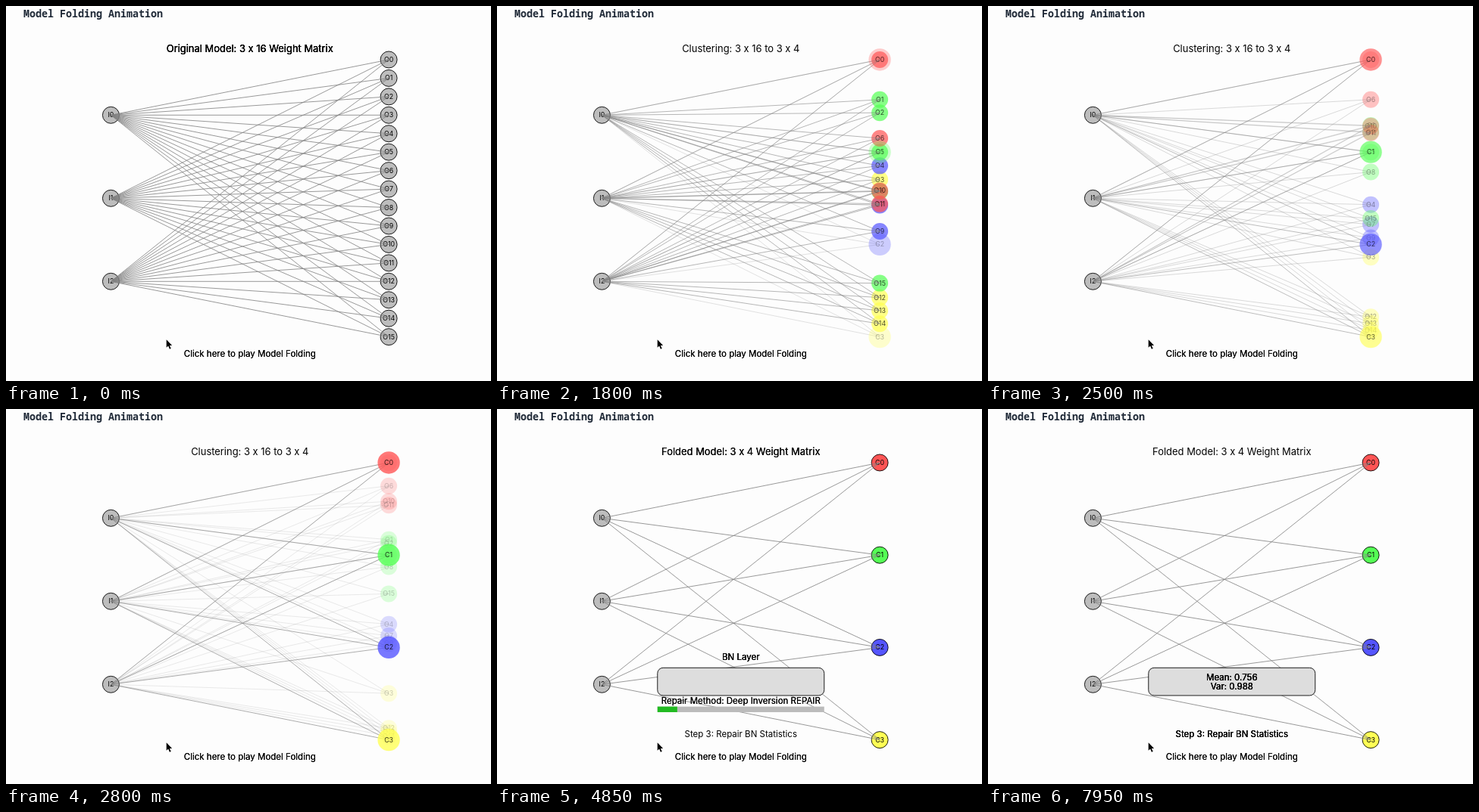
An HTML page with a canvas for the animation above (8.05 s loop, 640 px wide and 496 px high).

```html
<!DOCTYPE html>
<html lang="en">
<head>
<meta charset="utf-8">
<title>Model Folding Animation</title>
<style>
  html, body { margin: 0; width: 100%; height: 100%; overflow: hidden; background: #fdfdfd; }
  canvas { position: absolute; left: 0; top: 0; width: 640px; height: 496px; }
  h1 {
    position: absolute; left: 23px; top: 0; margin: 0; color: #1f2937; white-space: nowrap;
    font: bold 13.33px/20px "Noto Sans Mono", "DejaVu Sans Mono", monospace;
  }
</style>
</head>
<body>
<canvas id="stage"></canvas>
<h1>Model Folding Animation</h1>
<script>
const LOOP = 8050;
const FOLD_START = 1220, FOLD_TIME = 2000;
const REPAIR_START = 4614, REPAIR_TIME = 2000;
const SCALE = 11 / 15, LEFT = 65.1, TOP = 34.3;
const MID = 350, IN_X = 100, OUT_X = 600;
const TITLE = 17.65, BODY = 15.7, LABEL = 12;

const GRAY = '#bdbdbd';
const COLORS = ['#ff5555', '#55ff55', '#5555ff', '#ffff55'];
const CLUSTER_OF = [0, 1, 1, 3, 2, 1, 0, 2, 1, 2, 0, 0, 3, 3, 3, 1];

const column = (count, x, top, gap, name) =>
  Array.from({ length: count }, (_, i) => ({ x, y: top + gap * i, name: name + i }));

const inputs = column(3, IN_X, 150, 150, 'I');
const outputs = column(16, OUT_X, 50, 500 / 15, 'O');
const clusters = column(4, OUT_X, 50, 500 / 3, 'C');

const canvas = document.getElementById('stage');
const ctx = canvas.getContext('2d');
const ratio = window.devicePixelRatio || 1;
canvas.width = 640 * ratio;
canvas.height = 496 * ratio;

// Repeated passes thicken the antialiased glyph edges.
function text(str, x, y, size, passes = 1) {
  ctx.font = `${size}px Inter, "Noto Sans", sans-serif`;
  ctx.fillStyle = '#000';
  for (let i = 0; i < passes; i++) ctx.fillText(str, x, y + 0.6);
}

function node(n, color, radius, outlined) {
  ctx.beginPath();
  ctx.arc(n.x, n.y, radius, 0, Math.PI * 2);
  ctx.fillStyle = color;
  ctx.fill();
  if (outlined) {
    ctx.strokeStyle = '#000';
    ctx.lineWidth = 1.2;
    ctx.stroke();
  }
  text(n.name, n.x, n.y, LABEL);
}

function edges(targets) {
  ctx.strokeStyle = '#808080';
  ctx.lineWidth = 1.1;
  for (const a of inputs) {
    for (const b of targets) {
      ctx.beginPath();
      ctx.moveTo(a.x, a.y);
      ctx.lineTo(b.x, b.y);
      ctx.stroke();
    }
  }
}

const drawInputs = () => inputs.forEach(n => node(n, GRAY, 15, true));
const drawClusters = (radius, outlined) =>
  clusters.forEach((n, i) => node(n, COLORS[i], radius, outlined));

function drawOriginal() {
  text('Original Model: 3 x 16 Weight Matrix', MID, 30, TITLE, 3);
  drawInputs();
  outputs.forEach(n => node(n, GRAY, 15, true));
  edges(outputs);
}

function drawFolding(p) {
  text('Clustering: 3 x 16 to 3 x 4', MID, 30, TITLE);
  drawInputs();
  const moving = outputs.map((n, i) => ({
    ...n, y: n.y + (clusters[CLUSTER_OF[i]].y - n.y) * p
  }));
  ctx.globalAlpha = 1 - p;
  moving.forEach((n, i) => node(n, COLORS[CLUSTER_OF[i]], 15, false));
  edges(moving);
  ctx.globalAlpha = p;
  edges(clusters);
  drawClusters(20, false);
  ctx.globalAlpha = 1;
}

function drawFolded() {
  text('Folded model: 3 x 4 Weight Matrix', MID, 30, TITLE, 2);
  drawInputs();
  drawClusters(20, false);
  edges(clusters);
}

function drawRepair(p) {
  const done = p >= 1;
  text('Folded Model: 3 x 4 Weight Matrix', MID, 30, TITLE, done ? 1 : 2);
  drawInputs();
  drawClusters(15, true);
  edges(clusters);

  ctx.beginPath();
  ctx.roundRect(200, 420, 300, 50, 10);
  ctx.fillStyle = '#dddddd';
  ctx.fill();
  ctx.strokeStyle = '#000';
  ctx.lineWidth = 1.2;
  ctx.stroke();

  if (done) {
    text('Mean: 0.756', MID, 438, BODY, 3);
    text('Var: 0.988', MID, 453.5, BODY, 3);
  } else {
    text('BN Layer', MID, 400, BODY, 3);
    text('Repair Method: Deep Inversion REPAIR', MID, 480, BODY, 2);
    ctx.fillStyle = '#bbbbbb';
    ctx.fillRect(200, 490, 300, 10);
    ctx.fillStyle = '#22bb22';
    ctx.fillRect(200, 490, 300 * p, 10);
  }
  text('Step 3: Repair BN Statistics', MID, 540, BODY, done ? 3 : 1);
}

function drawCursor() {
  ctx.setTransform(ratio, 0, 0, ratio, 211.7 * ratio, 441.2 * ratio);
  const arrow = new Path2D('M0 0V10.6L2.4 8.4L4.2 12.6L6 11.8L4.2 7.7H7.4Z');
  ctx.strokeStyle = '#fff';
  ctx.lineWidth = 1.4;
  ctx.stroke(arrow);
  ctx.fillStyle = '#000';
  ctx.fill(arrow);
}

function draw(t) {
  ctx.setTransform(ratio, 0, 0, ratio, 0, 0);
  ctx.fillStyle = '#fdfdfd';
  ctx.fillRect(0, 0, 640, 496);
  ctx.translate(LEFT, TOP);
  ctx.scale(SCALE, SCALE);
  ctx.textAlign = 'center';
  ctx.textBaseline = 'middle';

  if (t < FOLD_START) drawOriginal();
  else if (t < FOLD_START + FOLD_TIME) drawFolding((t - FOLD_START) / FOLD_TIME);
  else if (t < REPAIR_START) drawFolded();
  else drawRepair((t - REPAIR_START) / REPAIR_TIME);

  text('Click here to play Model Folding', MID, 580, BODY, 2);
  drawCursor();
}

const start = performance.now();
function tick() {
  draw((performance.now() - start) % LOOP);
  requestAnimationFrame(tick);
}
tick();
</script>
</body>
</html>
```
